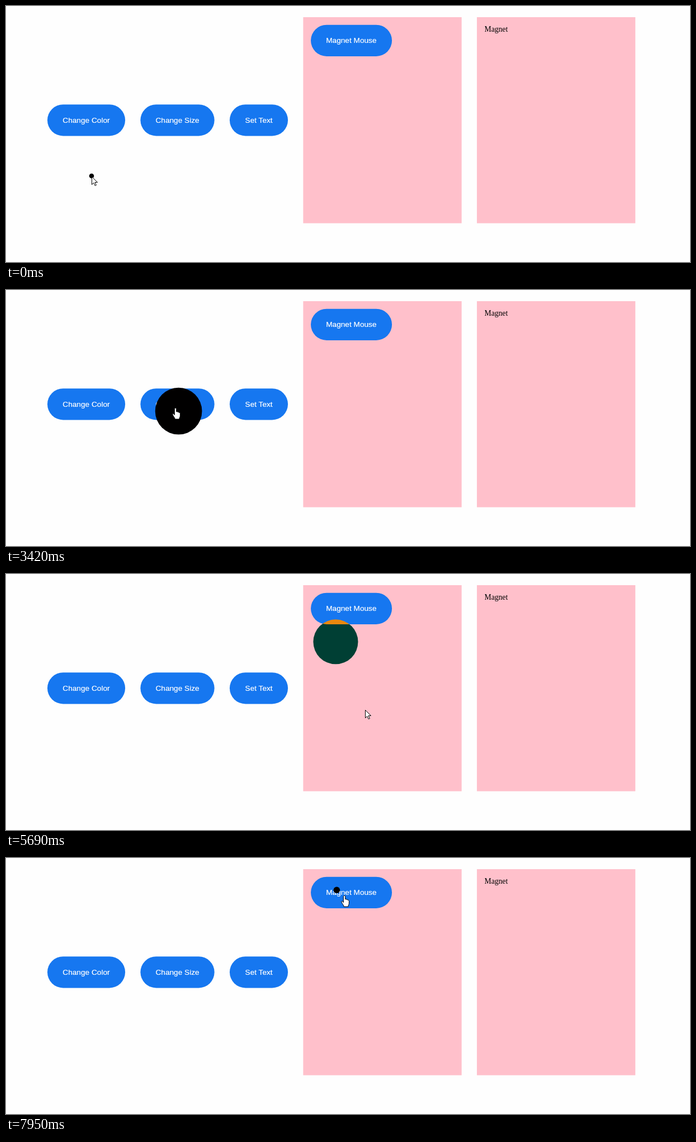
Recreate the animation shown at these times as an HTML page. Size 1223 by 458 pixels, loop 8 s.

```html
<!DOCTYPE html>
<html lang="en">
<head>
<meta charset="utf-8">
<title>Magnet cursor</title>
<style>
  html, body { margin: 0; width: 100%; height: 100%; overflow: hidden; background: #fefefe; }
  #stage {
    position: relative; width: 1223px; height: 458px; overflow: hidden;
    background: #fefefe; isolation: isolate;
    font: 16px/18px "Liberation Serif", "Times New Roman", serif;
  }
  #row {
    position: absolute; left: 74.2px; top: 19.8px;
    display: flex; gap: 32px; align-items: center;
    transform: scale(.8533); transform-origin: 0 0;
  }
  .panel { width: 300px; height: 400px; padding: 16px; background: #ffc0cb; color: #000; }
  .btn {
    display: inline-block; padding: 24px 32px; border-radius: 33px;
    background: #1677f0; color: #fff; white-space: nowrap;
    font: 16px/18px "Liberation Sans", Arial, sans-serif;
    -webkit-text-stroke: .25px #fff;
  }
  #dot {
    position: absolute; left: -43px; top: -43px; width: 86px; height: 86px; border-radius: 50%;
    color: #fff; font-size: 13.65px; line-height: 86px; text-align: center;
    -webkit-text-stroke: .35px #fff;
  }
  #pointer { position: absolute; left: 0; top: 0; width: 1px; height: 1px; overflow: visible; }
  #pointer path { fill: #fff; stroke: #000; stroke-linejoin: round; }
</style>
</head>
<body>
<div id="stage">
  <div id="row">
    <div class="btn" id="color">Change Color</div>
    <div class="btn" id="size">Change Size</div>
    <div class="btn" id="text">Set Text</div>
    <div class="panel" id="field"><div class="btn" id="magnet">Magnet Mouse</div></div>
    <div class="panel">Magnet</div>
  </div>
  <div id="dot"></div>
  <svg id="pointer">
    <path id="arrow" d="M.5 .5V14.5L3.8 11.4L6.2 16.5L8.4 15.5L6 10.5H10.5Z"/>
    <path id="hand" d="M-1.7 12.5V1.8C-1.7-.2 1.7-.2 1.7 1.8V7C2.2 6 4 6.2 4.1 7.6C4.8 6.9 6.3 7.2 6.4 8.5C7.2 8 8.4 8.6 8.4 9.8V14C8.4 16 7 17 6.8 20H-.8C-1 17.5-3.5 15.5-5 12C-5.8 10.3-3.8 9.4-2.9 10.7Z"/>
  </svg>
</div>
<script>
  const LOOP = 8000, STEP = 5;
  const $ = id => document.getElementById(id);
  const dot = $('dot'), pointer = $('pointer'), arrow = $('arrow'), hand = $('hand');

  // Mouse route: [time, x, y]
  const route = [
    [0, 153, 305], [250, 182, 318], [550, 100, 342], [800, 92, 296], [1200, 155, 254],
    [1530, 161.5, 187.5], [1900, 122, 197], [2250, 165, 231], [2490, 197, 257],
    [2730, 282, 291], [3000, 335, 232], [3300, 306, 206], [3670, 318, 232],
    [4080, 434, 256], [4400, 485, 208], [4620, 434, 196], [4860, 446, 213],
    [5250, 490, 335], [5700, 645, 240], [6050, 735, 122], [6300, 790, 180],
    [6580, 735, 138], [6850, 795, 230], [7150, 670, 335], [7560, 578, 90],
    [7750, 574, 45], [7950, 605, 67]
  ];

  // Smooth curve through the timed points
  function mouseAt(t) {
    let i = 0;
    while (i < route.length - 2 && route[i + 1][0] <= t) i++;
    const p = route[i], q = route[i + 1];
    const before = route[i - 1] || p, after = route[i + 2] || q;
    const d = q[0] - p[0], u = Math.min(1, (t - p[0]) / d), v = 1 - u;
    return [1, 2].map(k => {
      const m = (q[k] - before[k]) / (q[0] - before[0]) * d;
      const n = (after[k] - p[k]) / (after[0] - p[0]) * d;
      return v * v * (1 + 2 * u) * p[k] + u * v * v * m + u * u * (3 - 2 * u) * q[k] - u * u * v * n;
    });
  }

  const areas = ['color', 'size', 'text', 'magnet', 'field'].map(id => [id, $(id).getBoundingClientRect()]);
  const areaAt = ([x, y]) =>
    (areas.find(([, r]) => x > r.left && x < r.right && y > r.top && y < r.bottom) || [''])[0];

  const box = $('magnet').getBoundingClientRect();
  const anchor = [box.left + box.width / 2 + 3, box.top + box.height / 2 + 3];

  // The dot eases toward what the area under the mouse asks for
  const ease = tau => 1 - Math.exp(-STEP / tau);
  const SLOW = ease(210), FAST = ease(120);
  const poses = [];
  let x = 153, y = 304, scale = .1, red = 0;
  for (let t = 0; t < LOOP; t += STEP) {
    const mouse = mouseAt(t), area = areaAt(mouse);
    const [tx, ty] = area === 'field' ? anchor : mouse;
    const big = ['size', 'text', 'field'].includes(area);
    if (t) {
      x += (tx - x) * SLOW;
      y += (ty - y) * SLOW;
      scale += ((big ? 1 : .1) - scale) * FAST;
      red += ((area === 'color' ? 255 : 0) - red) * SLOW;
    }
    poses.push({ mouse, area, x, y, scale, red });
  }

  function draw(now) {
    const { mouse, area, x, y, scale, red } = poses[Math.floor(now % LOOP / STEP)];
    const blend = area === 'field', over = area && !blend;

    pointer.style.transform = `translate(${Math.round(mouse[0])}px, ${Math.round(mouse[1])}px)`;
    arrow.style.display = over ? 'none' : '';
    hand.style.display = over ? '' : 'none';

    dot.style.transform = `translate(${x}px, ${y}px) scale(${scale})`;
    dot.style.background = blend ? '#fff' : `rgb(${Math.round(red)}, 0, 0)`;
    dot.style.mixBlendMode = blend ? 'difference' : 'normal';
    dot.textContent = area === 'text' ? 'Click!' : '';
  }

  const start = performance.now();
  (function tick() {
    draw(performance.now() - start);
    requestAnimationFrame(tick);
  })();
</script>
</body>
</html>
```
